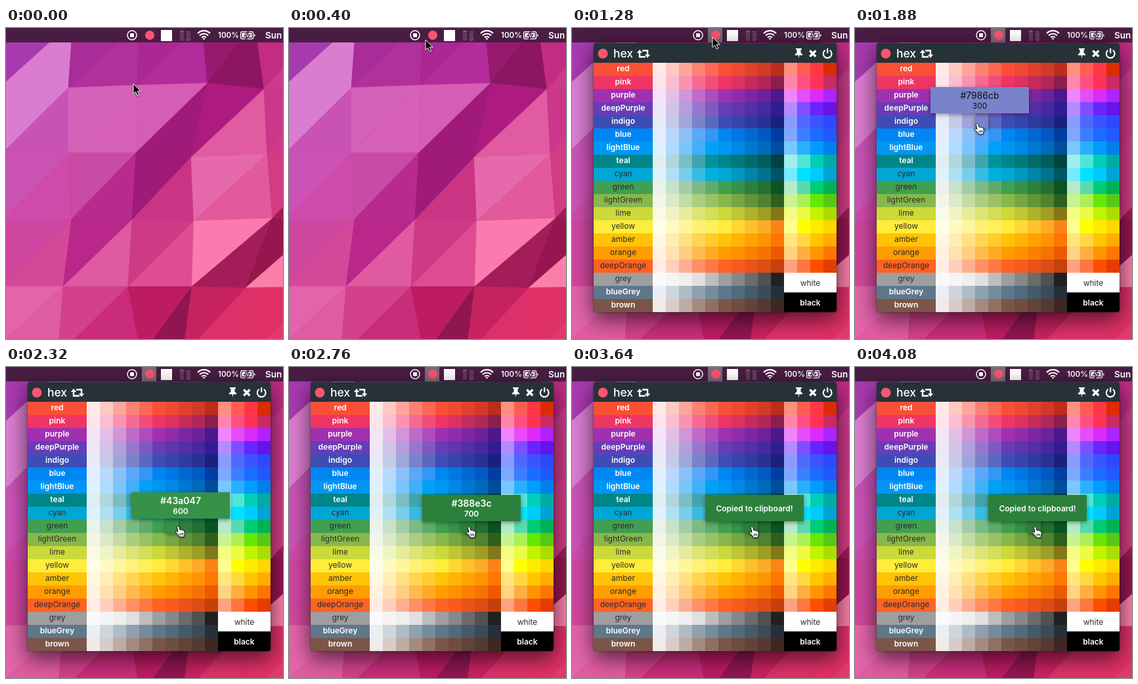
Recreate the animation shown at these times as an HTML page. Size 422 by 474 pixels, loop 4.12 s.

```html
<!DOCTYPE html>
<html lang="en">
<head>
<meta charset="utf-8">
<title>Colour palette</title>
<style>
  html, body { margin: 0; width: 100%; height: 100%; overflow: hidden; background: #4a1c42; }
  svg { display: block; width: 422px; height: 474px; }
  text { font-family: Inter, "Liberation Sans", sans-serif; text-anchor: middle; }
  .bar text { text-anchor: start; fill: #fff; font-weight: 600; }
  .line { fill: none; stroke: #fff; }
  .shadow { filter: drop-shadow(0 10px 16px rgba(0,0,0,.45)) drop-shadow(0 0 1px rgba(0,0,0,.6)); }
  .lift { filter: drop-shadow(0 2px 3px rgba(0,0,0,.4)); }
  .cursor { filter: drop-shadow(0 1px 1px rgba(0,0,0,.4)); }
</style>
</head>
<body>
<svg viewBox="0 0 422 474">
  <g id="wall"></g>
  <g class="bar">
    <rect width="422" height="22" fill="#491d43"/>
    <rect id="lit" x="207" width="22" height="22" fill="#7b6c79"/>
    <circle cx="192" cy="11" r="7" class="line" stroke-width="1.5"/>
    <rect x="189" y="8" width="6" height="6" rx="1" fill="#fff"/>
    <circle cx="219" cy="11" r="7" fill="#fb5570"/>
    <rect x="236" y="3" width="17" height="17" fill="#fff"/>
    <path d="M265 6h6M265 9h6M265 12h6M265 15h6M265 18h6M275 6h6M275 9h6M275 12h6M275 15h6M275 18h6M265 6l3-2 3 2M275 17l3 2 3-2" fill="none" stroke="#7c5a78" stroke-width="1.6"/>
    <g class="line" stroke-width="2.1">
      <path d="M292 8.3a13 13 0 0 1 19 0"/>
      <path d="M295 11.6a9 9 0 0 1 13 0"/>
      <path d="M298 14.6a5 5 0 0 1 7 0"/>
    </g>
    <path d="M301.5 18.2l-2-2.1a3 3 0 0 1 4 0z" fill="#fff"/>
    <text x="323" y="15" font-size="11.6">100%</text>
    <rect x="357.6" y="5.6" width="19" height="11" rx="2" class="line" stroke-width="1.3"/>
    <path d="M378.200 9v4.500q1.500-.6 1.500-2.200t-1.500-2.300z" fill="#fff"/>
    <rect x="359.500" y="7.500" width="15" height="7" fill="#fff"/>
    <path d="M369.500 4.500l-6.500 7.500h3.800l-1.600 6 6.500-7.600h-3.800z" fill="#fff" stroke="#491d43" stroke-width="1.4"/>
    <text x="395" y="16" font-size="13.500">Sun</text>
  </g>
  <g id="panel">
    <rect class="shadow" x="33" y="23" width="370" height="410" rx="4" fill="#263238"/>
    <clipPath id="round"><rect x="33" y="23" width="370" height="410" rx="4"/></clipPath>
    <g id="cells" clip-path="url(#round)" shape-rendering="crispEdges"></g>
    <g id="labels"></g>
    <circle cx="47" cy="39" r="7.5" fill="#fb5570"/>
    <text x="78" y="45" font-size="17.5" font-weight="500" fill="#fff">hex</text>
    <g class="line" stroke-width="2.4">
      <path d="M103 36v8h9M107 34.5h8v7.5"/>
      <path d="M362.3 34.5l9 9M371.3 34.5l-9 9" stroke-width="3.4"/>
      <path d="M385.6 33.9a6.4 6.4 0 1 0 7.2 0M389.2 31v7.5" stroke-width="2.2"/>
    </g>
    <path d="M98.8 38l4.2-5 4.2 5zM110.8 40.5h8.4l-4.2 5zM341 31h9v2h-1.5v5q3 1.2 3 3.5h-5.2l-.8 5-.8-5h-5.2q0-2.300 3-3.500v-5H341z" fill="#fff"/>
  </g>
  <rect id="hover" class="lift" width="20" height="20"/>
  <g id="tip">
    <rect id="tipBox" class="lift" x="-75" width="150" height="40"/>
    <text id="code" y="18" font-size="14"></text>
    <text id="shade" y="33" font-size="12"></text>
    <text id="done" y="24.500" font-size="12" font-weight="600">Copied to clipboard!</text>
  </g>
  <path id="arrow" class="cursor" d="M0 0v15.5l3.6-3.400 2.500 5.900 2.700-1.100-2.500-5.800h5z" fill="#000" stroke="#fff"/>
  <g id="hand" class="cursor" stroke="#000" stroke-width=".9">
    <path d="M-1.600.7Q-1-.9.700-.3 1.700.2 2 1.700L3 5.200q1.600-.9 2.500.3 1.500-.8 2.300.5 1.600-.4 2 1.200.9 3.200 0 5.200L9 16H2.300q-.8-2.300-2.700-4L-3.800 8.600q-.4-1.600 1.400-1.600L0 8.200z" fill="#fff"/>
    <path d="M3.200 10v3.500M5.300 10v3.500M7.400 10v3.500" fill="none"/>
  </g>
</svg>
<script>
const LOOP = 4120, STEP = 40, OPEN = 840, COPY = 2800;
const $ = id => document.getElementById(id);

// Wallpaper: a bent grid, every cell cut from top right to bottom left
const grid = [
  '-10,-10 102,-10 204,-10 298,-10 379,-10 475,0',
  '-10,91 95,91 200,87 307,84 393,93 475,92',
  '-10,195 95,190 198,190 282,197 398,192 500,190',
  '-10,295 100,291 192,292 286,294 406,290 475,300',
  '-10,394 87,394 186,394 283,394 365,396 475,394',
  '-28,500 79,500 206,500 269,500 370,500 475,500'
].map(r => r.split(' '));
const facets = [
  'a83ab0 da7dd0 a92d98 b0309c ab2794 b32c9a 981a70 8d1663 c22c85 cb3a8c',
  'da7dd0 c853b5 d362b8 d761b7 d65db4 a01a79 ad1b81 e05ba0 cb3789 d23b8a',
  'cc53b6 cf4bab c94ba3 b92a90 a01a78 cb3485 e66aab e25a9b d23c82 a11b56',
  'cf46a0 d34899 b9278a df5a9f cd3b88 df4c91 fb7bae a51c5a 971650 fb7fa9',
  'e264aa df5ca0 d24189 c92d7a bd1b62 8f1650 c72260 dd3069 df3067 e03a6e'
].map(r => r.split(' '));
$('wall').innerHTML = facets.map((row, r) => row.map((c, i) => {
  const k = i >> 1, tr = grid[r][k + 1], bl = grid[r + 1][k];
  const corner = i % 2 ? grid[r + 1][k + 1] : grid[r][k];
  return `<polygon points="${tr} ${corner} ${bl}" fill="#${c}" stroke="#${c}" stroke-width=".6"/>`;
}).join('')).join('');

// Palette: name, 500, 900, then the four accents
const hues = `red f44336 b71c1c ff8a80 ff5252 ff1744 d50000
pink e91e63 880e4f ff80ab ff4081 f50057 c51162
purple 9c27b0 4a148c ea80fc e040fb d500f9 aa00ff
deepPurple 673ab7 311b92 b388ff 7c4dff 651fff 6200ea
indigo 3f51b5 1a237e 8c9eff 536dfe 3d5afe 304ffe
blue 2196f3 0d47a1 82b1ff 448aff 2979ff 2962ff
lightBlue 03a9f4 01579b 80d8ff 40c4ff 00b0ff 0091ea
teal 009688 004d40 a7ffeb 64ffda 1de9b6 00bfa5
cyan 00bcd4 006064 84ffff 18ffff 00e5ff 00b8d4
green 4caf50 1b5e20 b9f6ca 69f0ae 00e676 00c853
lightGreen 8bc34a 33691e ccff90 b2ff59 76ff03 64dd17
lime cddc39 827717 f4ff81 eeff41 c6ff00 aeea00
yellow ffeb3b f57f17 ffff8d ffff00 ffea00 ffd600
amber ffc107 ff6f00 ffe57f ffd740 ffc400 ffab00
orange ff9800 e65100 ffd180 ffab40 ff9100 ff6d00
deepOrange ff5722 bf360c ff9e80 ff6e40 ff3d00 dd2c00
grey 9e9e9e 212121
blueGrey 607d8b 263238
brown 795548 3e2723`.split('\n').map(l => l.split(' '));
const names = ['50', '100', '200', '300', '400', '500', '600', '700', '800', '900', 'A100', 'A200', 'A400', 'A700'];
const tints = [.88, .7, .5, .303, .15, 0], darks = [.185, .41, .615, 1];
const greyTints = [.95, .9, .83, .68, .32, 0];

const rgb = h => [0, 2, 4].map(i => parseInt(h.substr(i, 2), 16));
const mix = (a, b, t) => a.map((v, i) => Math.round(v + (b[i] - v) * t));
const hex = c => '#' + c.map(v => v.toString(16).padStart(2, '0')).join('');
const isLight = ([r, g, b]) => .299 * r + .587 * g + .114 * b > 130;

// Colour as it looks on the display profile: warmer reds, duller greens
function shown(c) {
  const [r, g, b] = c.map(v => (v / 255) ** 2.2);
  return hex([1.06 * r - .06 * g, .77 * g + .2 * Math.min(r, g) + .03 * r, b]
    .map(v => Math.round(255 * Math.min(1, Math.max(0, v)) ** (1 / 2.2))));
}

const shades = hues.map(([name, mid, deep, ...accents]) => {
  const m = rgb(mid), light = name === 'grey' ? greyTints : tints;
  return [...light.map(t => mix(m, [255, 255, 255], t)),
    ...darks.map(t => mix(m, rgb(deep), t)), ...accents.map(rgb)];
});
const rect = (x, y, w, h, fill) => `<rect x="${x}" y="${y}" width="${w}" height="${h}" fill="${fill}"/>`;
const ink = c => isLight(c) ? 'fill="#2b2b2b"' : 'fill="#fff" font-weight="600"';
const label = (x, y, s, c) => `<text x="${x}" y="${y}" font-size="12" ${ink(c)}>${s}</text>`;

$('cells').innerHTML = shades.map((row, r) =>
  rect(33, 53 + 20 * r, 90, 20, shown(row[5])) +
  row.map((c, i) => rect(123 + 20 * i, 53 + 20 * r, 20, 20, shown(c))).join('')).join('') +
  rect(323, 373, 80, 30, '#fff') + rect(323, 403, 80, 30, '#000');
$('labels').innerHTML = hues.map(([name], r) => label(78, 66 + 20 * r, name, shades[r][5])).join('') +
  label(363, 392.5, 'white', [255, 255, 255]) + label(363, 422.5, 'black', [0, 0, 0]);

// Pointer: time, x, y, gap between pointer and tooltip
const path = [
  [0, 194, 85, 12], [120, 196, 72, 12], [400, 208, 18, 12], [560, 213, 14, 12],
  [1320, 214, 14, 12], [1520, 206, 62, 16], [1720, 190, 132, 16], [1880, 186, 146, 16],
  [1960, 190, 150, 15], [2160, 236, 210, 13], [2320, 262, 243, 12], [2480, 272, 244, 9], [2560, 274, 244, 9]
];
function pointer(t) {
  const i = path.findIndex(p => p[0] > t);
  if (i < 0) return path[path.length - 1].slice(1);
  const a = path[i - 1], b = path[i], f = (t - a[0]) / (b[0] - a[0]);
  return [1, 2, 3].map(k => a[k] + (b[k] - a[k]) * f);
}

const show = (id, on) => { $(id).style.display = on ? '' : 'none'; };
const place = (id, x, y) => $(id).setAttribute('transform', `translate(${Math.round(x)} ${Math.round(y)})`);

function draw(t) {
  const [x, y, gap] = pointer(t), open = t >= OPEN, copied = t >= COPY;
  const row = Math.floor((y - 53) / 20), col = Math.floor((x - 123) / 20);
  const c = open && shades[row] && shades[row][col];
  show('panel', open);
  show('lit', open);
  for (const id of ['hover', 'tip', 'hand']) show(id, c);
  show('arrow', !c);
  place(c ? 'hand' : 'arrow', x, y);
  if (!c) return;

  const fill = shown(c), light = isLight(c);
  place('hover', 123 + 20 * col, 53 + 20 * row);
  place('tip', x + 4, Math.max(23, y - gap - 40));
  $('hover').setAttribute('fill', fill);
  $('tipBox').setAttribute('fill', fill);
  $('tip').setAttribute('fill', light ? '#111' : '#fff');
  $('code').textContent = hex(c);
  $('shade').textContent = names[col];
  for (const id of ['code', 'shade']) {
    $(id).setAttribute('font-weight', light ? 400 : 600);
    show(id, !copied);
  }
  show('done', copied);
}

const start = performance.now();
function tick() {
  const t = (performance.now() - start) % LOOP;
  draw(Math.floor(t / STEP) * STEP);
  requestAnimationFrame(tick);
}
tick();
</script>
</body>
</html>
```
